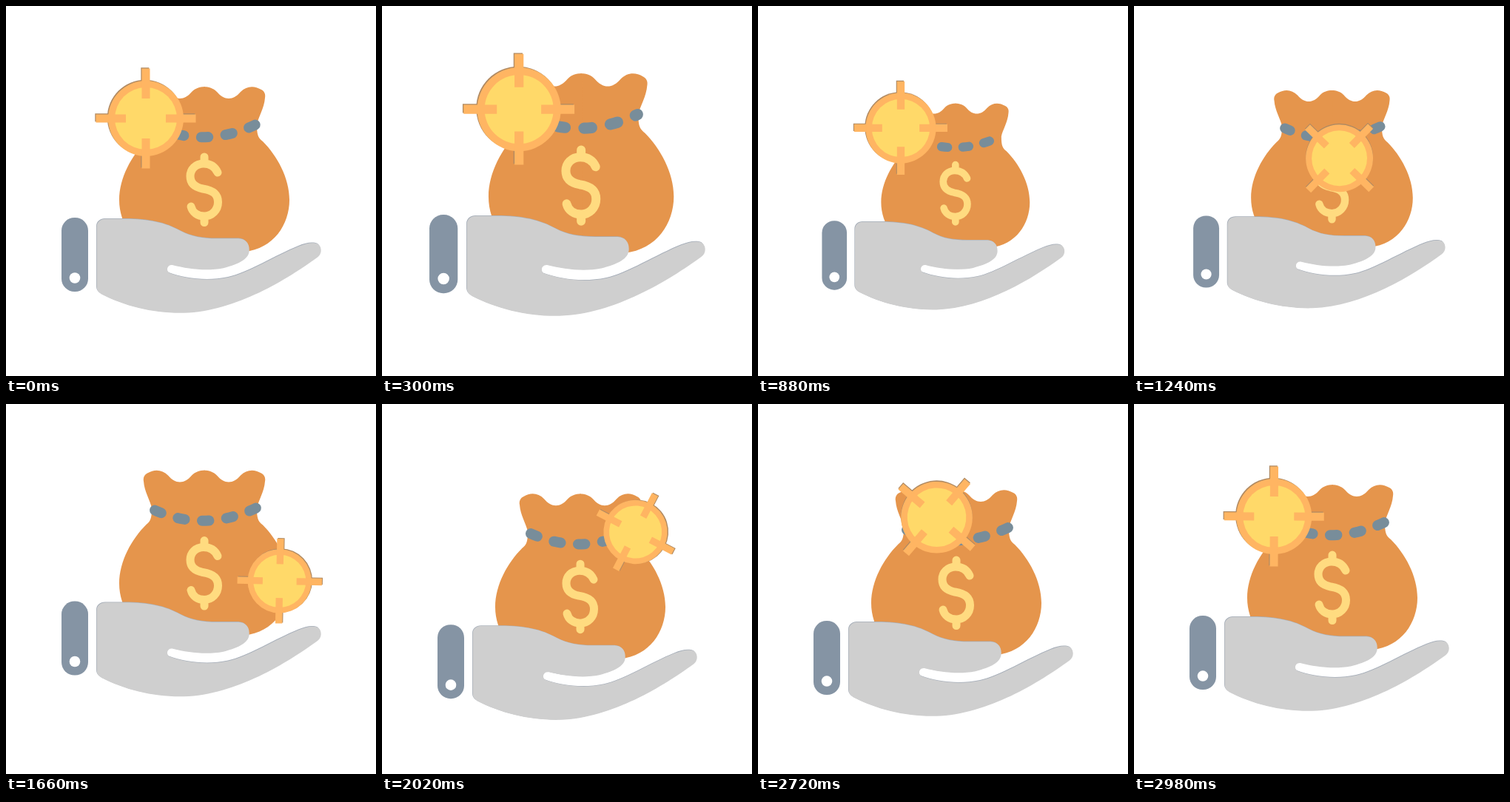
An HTML page that plays this animation: 500 by 500 pixels, repeating every 3 s.

```html
<!DOCTYPE html>
<html lang="en">
<head>
<meta charset="utf-8">
<title>Money bag in hand</title>
<style>
  html, body { margin: 0; width: 100%; height: 100%; overflow: hidden; background: #fff; }
  svg { display: block; width: 100vw; height: 100vh; }
  .line { fill: none; stroke-linecap: round; stroke-linejoin: round; }
</style>
</head>
<body>
<svg viewBox="0 0 500 500">
  <defs>
    <path id="palm" d="M122 298C122 291 127 287 134 287L160 287C193 287 215 292 235 303
      C250 311 265 313.5 285 313.5L314 313.5C323 314 328 320 328 328
      C329 341 314 348 293 353.5C270 358 245 354.5 225 349.5C217 348 215 357 220 360
      C242 368 272 372 300 366C325 361 365 336 395 324C405 320 414 318 421 321
      C427 326 426 335 420 339C380 368 310 412 240 414C200 415 160 405 129 389
      C124 386 122 383 122 378Z"/>
    <path id="side" d="M267 109.3H268C274 109.3 280 111 285 116C295 128 307 128 317 116
      C325 108 335 107 345 113C349 115 351 119 350 124C349 138 341 150 339 160
      C339 175 341 178 347 183C366 202 383 232 383 262C383 295 362 328 322 332H267Z"/>
    <g id="scope">
      <circle r="51"/>
      <path d="M-5.5-67.5h11v135h-11ZM-67.5-5.5h135v11h-135Z"/>
    </g>
  </defs>
  <g id="all">
    <g id="bag">
      <g fill="#e5954c">
        <use href="#side"/>
        <use href="#side" transform="translate(536) scale(-1 1)"/>
      </g>
      <path id="rope" class="line" stroke="#788d9a" stroke-width="14" stroke-dasharray="9.5 23.5"
        d="M201 163Q268 193 338 160"/>
      <path class="line" stroke="#ffdb80" stroke-width="11"
        d="M286 225C282 216 275 213 267 213C256 213 249 221 249 230C249 240 256 245 266 247
        C279 249 286.5 254 286.5 265C286.5 276 278 284 268 284C259 284 252 279 250 271
        M268 204V212M268 285V292.5"/>
    </g>
    <use href="#palm" fill="#a5adb8"/>
    <use href="#palm" x=".7" y=".7" fill="#cfcfcf"/>
    <rect x="75" y="286" width="36" height="100" rx="17.5" fill="#8594a4"/>
    <circle cx="93" cy="367.5" r="7.3" fill="#fff"/>
    <g id="target">
      <use href="#scope" x="-1.2" y="-1.2" fill="#b08a62"/>
      <use href="#scope" fill="#ffb562"/>
      <circle r="42" fill="#ffd969"/>
      <path fill="none" stroke="#ffb562" stroke-width="11" d="M0-50v23M0 27v23M-50 0h23M27 0h23"/>
    </g>
  </g>
</svg>
<script>
  const LOOP = 3000;
  const el = id => document.getElementById(id);
  const all = el("all"), bag = el("bag"), rope = el("rope"), target = el("target");

  // Eased progress from 0 to 1 between two times.
  function move(t, from, to) {
    const u = Math.min(1, Math.max(0, (t - from) / (to - from)));
    return (1 - Math.cos(Math.PI * u)) / 2;
  }

  // Swells by up, shrinks by down, then settles at 1.
  const pulse = (t, up, down, peak, low, end) =>
    1 + up * move(t, 0, peak) - (up + down) * move(t, peak, low) + down * move(t, low, end);

  const zoom = (cx, cy, s, dy = 0) =>
    `translate(${cx} ${cy + dy}) scale(${s}) translate(${-cx} ${-cy})`;

  function draw(t) {
    const out = move(t, 890, 1600);
    const tilt = move(t, 1600, 2060);
    const climb = move(t, 1600, 2200);
    const back = move(t, 2300, 3000);

    const scale = pulse(t, 0.069, 0.068, 375, 930, 1500);
    const lift = 20.5 * (2 * climb - move(t, 1080, 1600) - back);
    all.setAttribute("transform", zoom(250, 350, scale, lift));
    bag.setAttribute("transform", zoom(268, 221, pulse(t, 0.035, 0.066, 480, 900, 1450)));
    rope.setAttribute("stroke-dashoffset", 1.2 - 67.2 * move(t, 0, 1360));

    const x = 189 + 182 * out - 29 * tilt - 153 * back;
    const y = 152 + 110 * out - 127 * climb + 17 * back;
    const turn = 90 * out + 28 * tilt - 118 * back;
    const size = pulse(t, 0.062, 0.01, 470, 1000, 1600) - 0.153 * (out - back);
    target.setAttribute("transform", `translate(${x} ${y}) rotate(${turn}) scale(${size})`);
  }

  const start = performance.now();
  function tick() {
    draw((performance.now() - start) % LOOP);
    requestAnimationFrame(tick);
  }
  draw(0);
  requestAnimationFrame(tick);
</script>
</body>
</html>
```
